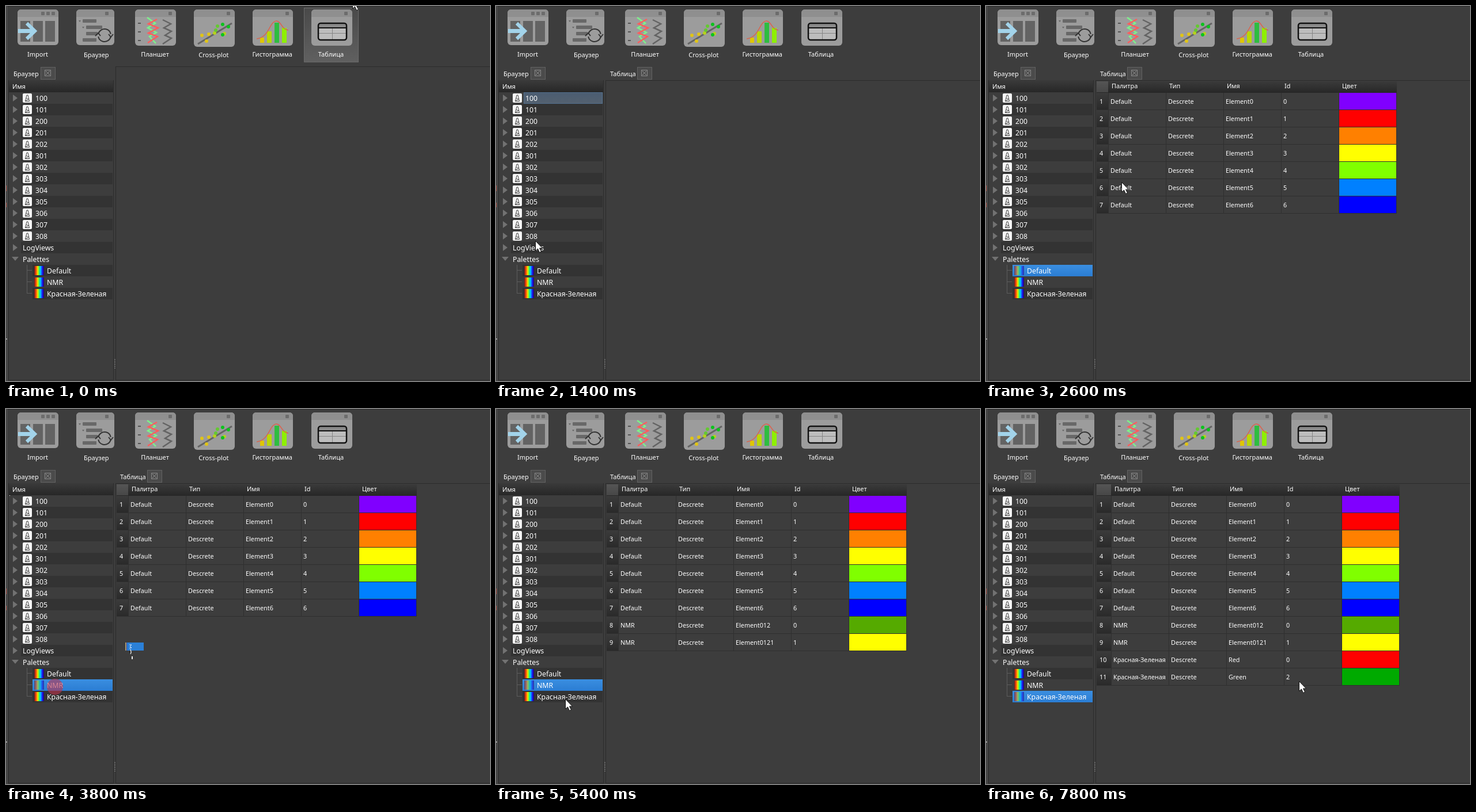
These frames come from a looping animation (840 by 652 pixels, 8 s). An HTML page with a canvas:

```html
<!DOCTYPE html>
<html lang="ru">
<head>
<meta charset="utf-8">
<style>
html, body { margin: 0; width: 100%; height: 100%; overflow: hidden; background: #3d3d3d; }
canvas { display: block; }
</style>
</head>
<body>
<canvas id="stage" width="840" height="652"></canvas>
<script>
const ctx = document.getElementById('stage').getContext('2d');
const STEP = 200, STEPS = 40;
const BG = '#3d3d3d', LINE = '#2c2c2c';

function rect(x, y, w, h, fill) {
  ctx.fillStyle = fill;
  ctx.fillRect(x, y, w, h);
}

function frame(x, y, w, h, color) {
  ctx.strokeStyle = color;
  ctx.lineWidth = 1;
  ctx.strokeRect(x + .5, y + .5, w - 1, h - 1);
}

function round(x, y, w, h, r, fill) {
  ctx.fillStyle = fill;
  ctx.beginPath();
  ctx.roundRect(x, y, w, h, r);
  ctx.fill();
}

function path(points, close) {
  ctx.beginPath();
  for (let i = 0; i < points.length; i += 2) ctx.lineTo(points[i], points[i + 1]);
  if (close) ctx.closePath();
}

function poly(points, fill) {
  path(points, true);
  ctx.fillStyle = fill;
  ctx.fill();
}

function line(points, color, width = 1) {
  path(points);
  ctx.strokeStyle = color;
  ctx.lineWidth = width;
  ctx.stroke();
}

function dot(x, y, r, fill) {
  ctx.fillStyle = fill;
  ctx.beginPath();
  ctx.arc(x, y, r, 0, 7);
  ctx.fill();
}

function text(s, x, y, size = 11, align = 'left') {
  ctx.font = size + 'px "Noto Sans", "Open Sans", sans-serif';
  ctx.textAlign = align;
  ctx.fillStyle = '#fff';
  ctx.fillText(s, x, y);
}

function shade(y, h, top, bottom) {
  const g = ctx.createLinearGradient(0, y, 0, y + h);
  g.addColorStop(0, top);
  g.addColorStop(1, bottom);
  return g;
}

function tile(x, w, h, sq) {
  round(x, 6, w, h, 6, '#9c9c9c');
  round(x, 6, w, 13, [6, 6, 0, 0], '#8f8f8f');
  round(sq, 10, 6, 6, 1, '#6c6c6c');
}

function importIcon() {
  tile(20, 71, 62, 61);
  round(70, 10, 6, 6, 1, '#6c6c6c');
  round(79, 10, 6, 6, 1, '#6c6c6c');
  for (const x of [25, 47, 68]) rect(x, 26, 17, 36, '#636363');
  line([21, 43.5, 48, 43.5], '#a2d3ea', 7);
  line([36, 30, 50, 43.5, 36, 57], '#a2d3ea', 6);
}

function browserIcon() {
  tile(122, 66, 62, 172);
  for (const [x, y, w] of [[133, 23, 24], [139, 34, 28], [139, 45, 20], [133, 56, 24]])
    round(x, y, w, 6, 1, '#686868');
  poly([126, 25, 130, 25, 128, 28], '#686868');
  poly([132, 36, 136, 36, 134, 39], '#686868');
  ctx.strokeStyle = '#333';
  ctx.lineWidth = 2;
  for (const a of [.25, Math.PI + .25]) {
    ctx.beginPath();
    ctx.arc(171, 51, 11, a, a + 2.7);
    ctx.stroke();
  }
  line([155, 52, 160, 47, 164, 52], '#333', 2);
  line([178, 49, 182, 54, 186, 49], '#333', 2);
}

function logIcon() {
  tile(224, 71, 63, 282);
  for (const y of [29, 44, 59]) rect(229, y, 5, 2, '#555');
  line([245, 20, 259, 30, 246, 38, 261, 46, 249, 53, 260, 65], '#7cf48a', 2.5);
  line([262, 23, 247, 31, 264, 38, 247, 47, 263, 53, 246, 64], '#ff5c5c', 2.5);
  line([272, 24, 286, 31, 274, 38, 287, 44, 276, 51, 287, 56, 272, 66], '#636363', 2.5);
}

function crossIcon() {
  tile(326, 71, 65, 383);
  line([333, 66, 392, 30], '#656565', 3);
  const dots = { '#e0c416': [340, 51, 348, 61, 352, 49], '#b4d21c': [362, 47, 379, 48],
    '#64c832': [364, 42, 367, 35], '#0cc41c': [376, 32, 386, 36, 376, 50] };
  for (const c in dots)
    for (let i = 0; i < dots[c].length; i += 2) dot(dots[c][i], dots[c][i + 1], 3, c);
}

function histIcon() {
  tile(428, 70, 63, 485);
  rect(441, 55, 7, 9, '#dfc500');
  rect(453, 44, 8, 20, '#b9d800');
  rect(466, 29, 8, 35, '#2ebd40');
  rect(479, 38, 8, 26, '#8ef000');
  ctx.beginPath();
  ctx.moveTo(435, 57);
  ctx.bezierCurveTo(457, 55, 457, 27, 469, 26);
  ctx.bezierCurveTo(478, 26, 478, 41, 490, 42);
  ctx.strokeStyle = '#d9654f';
  ctx.lineWidth = 1.5;
  ctx.stroke();
}

function tableIcon() {
  tile(530, 71, 63, 587);
  round(542, 30, 49, 29, 4, '#bdbdbd');
  rect(543, 31, 47, 7, '#8a8a8a');
  rect(543, 47, 47, 1, '#858585');
  rect(566, 39, 1, 19, '#858585');
  rect(542, 37, 49, 2, '#111');
  ctx.beginPath();
  ctx.roundRect(542, 30, 49, 29, 4);
  ctx.strokeStyle = '#111';
  ctx.lineWidth = 2.5;
  ctx.stroke();
}

function toolbar(step) {
  if (step < 4) {
    const down = step > 1;
    rect(517, 3, 95, 95, down ? shade(3, 95, '#323232', '#3a3a3a') : shade(3, 95, '#494949', '#606060'));
    frame(517, 3, 95, 95, down ? '#2a2a2a' : '#6a6a6a');
  }
  importIcon();
  browserIcon();
  logIcon();
  crossIcon();
  histIcon();
  tableIcon();
  ['Import', 'Браузер', 'Планшет', 'Cross-plot', 'Гистограмма', 'Таблица'].forEach((s, i) =>
    text(s, 55 + 101.8 * i, i === 1 || i === 3 ? 89 : 88, 11, 'center'));
}

function tab(name, x) {
  text(name, x + 13, 122);
  rect(x + 60, 106, 26, 22, '#4b4b4b');
  frame(x + 60, 106, 26, 22, '#626262');
  frame(x + 67, 111, 11, 11, '#8c8c8c');
  line([x + 69, 113, x + 76, 120], '#9a9a9a');
  line([x + 76, 113, x + 69, 120], '#9a9a9a');
}

function derrick(y) {
  round(29, y + 2, 16, 16, 2, '#f6f6f6');
  line([33.5, y + 15.5, 36, y + 5, 38, y + 5, 40.5, y + 15.5], '#444');
  line([33, y + 15.5, 41, y + 15.5], '#444');
  line([35, y + 10, 39, y + 12, 34, y + 15], '#555');
}

function rainbow(x, y, w, h) {
  const g = ctx.createLinearGradient(x, 0, x + w, 0);
  ['#5a2020', '#e03010', '#ff8000', '#e8f000', '#30f060', '#00d0ff', '#1060ff', '#2000e0', '#301050']
    .forEach((c, i, all) => g.addColorStop(i / (all.length - 1), c));
  rect(x, y, w, h, g);
}

const tree = ['100', '101', '200', '201', '202', '301', '302', '303', '304', '305', '306', '307', '308',
  'LogViews', 'Palettes', 'Default', 'NMR', 'Красная-Зеленая'];

function browser(step) {
  tab('Браузер', 0);
  rect(5, 129, 181, 21, shade(129, 21, '#3a3a3a', '#272727'));
  text('Имя', 11, 144);
  const selected = step < 10 ? -1 : step < 18 ? 15 : step < 28 ? 16 : 17;
  tree.forEach((name, i) => {
    const y = 150 + 20 * i, leaf = i > 14, x = leaf ? 46 : 26;
    if (i % 2) rect(x, y, 185 - x, 20, '#333');
    if (i === 0 && step > 3 && step < 10) {
      rect(48, y, 137, 20, shade(y, 20, '#4b5d72', '#54616f'));
      frame(48, y, 137, 20, '#52708e');
    }
    if (i === selected) rect(46, y, 139, 20, shade(y, 20, '#3a8ee0', '#2b7dd3'));
    if (leaf) {
      rect(36, y + 9, 9, 1, '#5c5c5c');
      rainbow(49, y + 2, 17, 16);
      if (i === selected) rect(49, y + 2, 17, 16, 'rgba(48,132,218,.45)');
    } else if (i === 14) {
      poly([10, y + 6, 22, y + 6, 16, y + 13], '#727272');
    } else {
      poly([12, y + 4, 20, y + 10, 12, y + 16], '#727272');
    }
    if (i < 13) derrick(y);
    text(name, leaf ? 71 : i > 12 ? 29 : 51, y + 15, 12.3);
  });
  rect(36, 450, 1, 50, '#5c5c5c');
  rect(4, 129, 1, 522, LINE);
  rect(186, 129, 1, 522, LINE);
  rect(4, 650, 183, 1, LINE);
}

const colors = ['#8000ff', '#f00', '#ff8000', '#ff0', '#80ff00', '#0080ff', '#00f', '#55aa00', '#ff0', '#f00', '#00aa00'];
const names = ['Element012', 'Element0121', 'Red', 'Green'];

function table(count) {
  const x0 = count > 9 ? 218 : 213;
  rect(192, 131, x0 + 500 - 192, 20, shade(131, 20, '#3a3a3a', '#272727'));
  rect(192, 131, x0 - 193, 19, shade(131, 19, '#555', '#474747'));
  ['Палитра', 'Тип', 'Имя', 'Id', 'Цвет'].forEach((s, i) => text(s, x0 + 5 + 100 * i, 143, 10.9));
  for (let i = 0; i < count; i++) {
    const y = 151 + 30 * i;
    rect(192, y, x0 - 193, 29, shade(y, 29, '#3b3b3b', '#2a2a2a'));
    rect(192, y + 29, x0 + 500 - 192, 1, '#2f2f2f');
    for (let c = 0; c < 6; c++) rect(x0 - 1 + 100 * c, y, 1, 30, '#2f2f2f');
    rect(x0 + 400, y, 99, 29, colors[i]);
    const cells = [i < 7 ? 'Default' : i < 9 ? 'NMR' : tree[17], 'Descrete',
      i < 7 ? 'Element' + i : names[i - 7], i < 7 ? i : [0, 1, 0, 2][i - 7]];
    text(i + 1, 197, y + 19, 10.8);
    cells.forEach((s, c) => text(s, x0 + 3 + 100 * c, y + 19, 10.8));
  }
}

function windowFrame(step) {
  rect(0, 0, 840, 652, BG);
  rect(0, 0, 840, 1, '#272727');
  rect(0, 0, 1, 652, '#303030');
  rect(1, 0, 1, 652, '#5b5b5b');
  rect(0, 312, 1, 10, '#a04038');
  rect(0, 342, 1, 8, '#a04038');
  rect(0, 578, 2, 2, '#aaa');
  const top = step < 4 ? 105 : 129;
  rect(190, top, 650, 1, LINE);
  rect(190, top, 1, 522 + 129 - top, LINE);
  rect(190, 650, 650, 1, LINE);
  for (let y = 614; y < 632; y += 3) rect(188, y, 2, 1, '#8a8a8a');
}

// step, x, y of the pointer tip
const keys = [[0, 601, -13], [2, 570, 42], [3, 570, 42], [4, 545, 62], [7, 68, 408], [9, 85, 468], [10, 85, 470],
  [12, 226, 330], [13, 235, 306], [15, 200, 372], [17, 90, 489], [18, 85, 483], [19, 215, 418], [20, 226, 400],
  [21, 240, 382], [22, 243, 368], [24, 190, 440], [26, 123, 511], [27, 120, 504], [28, 121, 505], [29, 225, 474],
  [30, 293, 466], [33, 258, 452], [36, 400, 442], [39, 543, 473]];

function pointer(step) {
  const i = Math.max(1, keys.findIndex(k => k[0] >= step));
  const [s0, x0, y0] = keys[i - 1], [s1, x1, y1] = keys[i];
  const p = (step - s0) / (s1 - s0);
  return [Math.round(x0 + (x1 - x0) * p), Math.round(y0 + (y1 - y0) * p)];
}

function arrow(x, y) {
  path([0, 0, 0, 17, 4, 13.5, 7, 20, 10, 18.5, 7, 12.5, 12, 12.5].map((v, i) => v + (i % 2 ? y : x) + .5), true);
  ctx.fillStyle = '#fff';
  ctx.fill();
  ctx.strokeStyle = '#111';
  ctx.lineWidth = 1;
  ctx.stroke();
}

function ghost(x, y) {
  rect(x - 8, y - 12, 32, 14, '#2b80d8');
  rect(x - 8, y - 12, 2, 14, '#a89a70');
  rect(x - 6, y - 12, 1, 14, '#3040a0');
  line([x - 1, y - 8, x + 3, y - 8, x, y - 5, x + 3, y - 3, x - 1, y - 2], '#dcecff');
  line([x + 1, y, x + 2, y + 5, x + 1, y + 8], '#eee', 1.5);
  rect(x, y + 2, 1, 5, '#111');
  rect(x + 3, y + 12, 2, 5, '#eee');
  rect(6, 150, 1, 1, '#fff');
}

const drags = [[10, 12, 85, 472], [18, 20, 85, 483], [28, 29, 121, 505]];

function draw(step) {
  windowFrame(step);
  toolbar(step);
  browser(step);
  if (step > 3) tab('Таблица', 185 + 0);
  if (step > 12) table(step < 21 ? 7 : step < 30 ? 9 : 11);
  const [x, y] = pointer(step);
  const drag = drags.find(d => step >= d[0] && step <= d[1]);
  if (drag) dot(drag[2], drag[3], 14, 'rgba(190,50,75,.6)');
  if (drag && step > drag[0]) ghost(x, y);
  else arrow(x, y);
}

function tick() {
  draw(Math.floor(performance.now() / STEP) % STEPS);
  requestAnimationFrame(tick);
}
tick();
</script>
</body>
</html>
```
